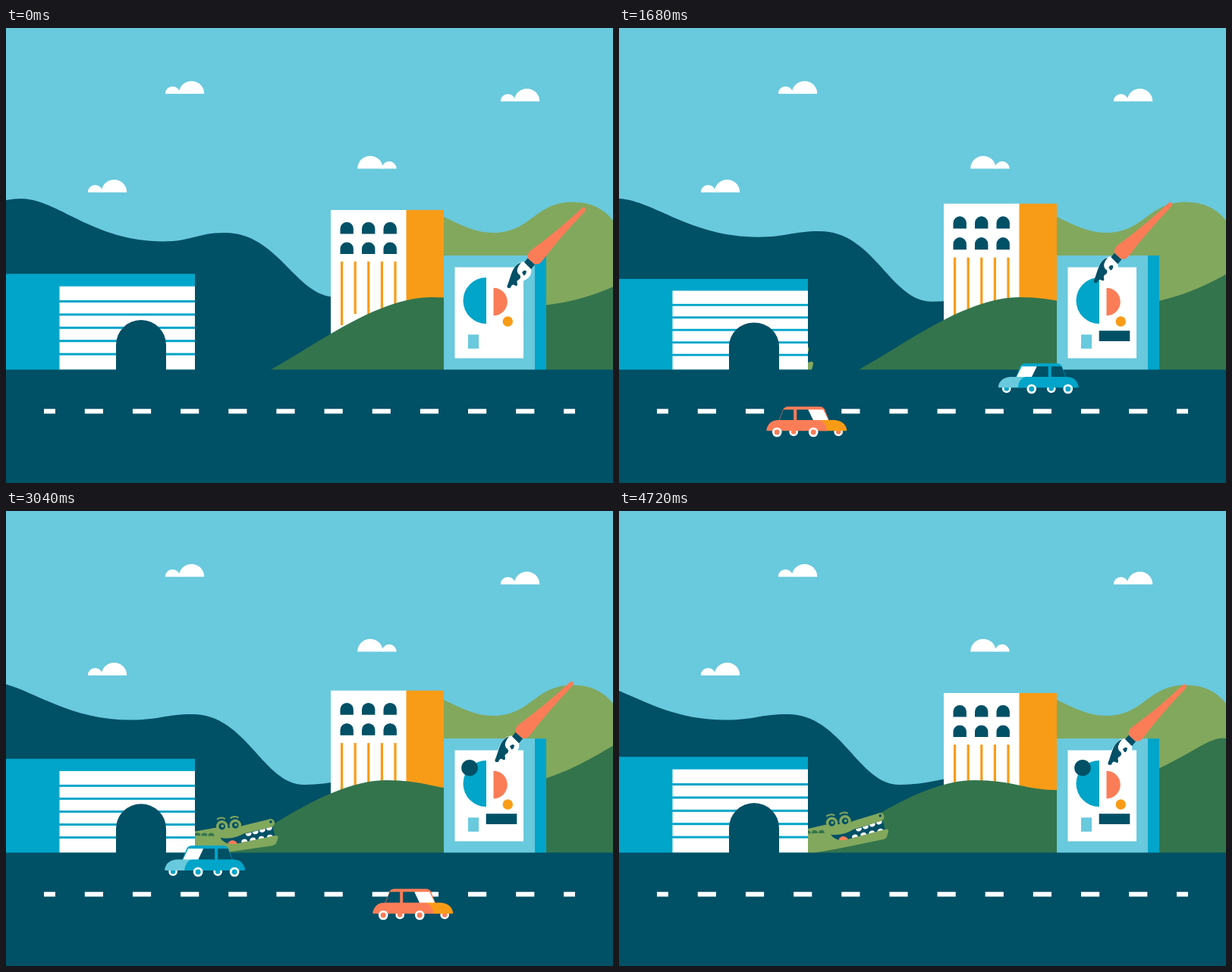
Write an HTML page with a canvas that moves like this. It is 800 px wide and 600 px high and loops after 4800 ms.

```html
<!DOCTYPE html>
<html>
<head>
<meta charset="utf-8">
<style>
html, body { margin: 0; width: 100%; height: 100%; overflow: hidden; }
canvas { display: block; }
</style>
</head>
<body>
<canvas id="stage" width="800" height="600"></canvas>
<script>
const ctx = document.getElementById('stage').getContext('2d');
const LOOP = 4800;
const SKY = '#69c9dd', NAVY = '#005066', TEAL = '#00a5c9', WHITE = '#fff',
      LIME = '#82a85d', GREEN = '#33744c', ORANGE = '#f89c17', CORAL = '#fa7d57';

// Eased progress from 0 to 1 between two times
function ramp(t, from, to) {
  const p = Math.min(1, Math.max(0, (t - from) / (to - from)));
  return (1 - Math.cos(Math.PI * p)) / 2;
}

function rect(color, x, y, w, h) {
  ctx.fillStyle = color;
  ctx.fillRect(x, y, w, h);
}

function disc(color, x, y, r, from = 0, to = 2 * Math.PI) {
  ctx.fillStyle = color;
  ctx.beginPath();
  ctx.arc(x, y, r, from, to);
  ctx.fill();
}

function shape(color, d) {
  ctx.fillStyle = color;
  ctx.fill(new Path2D(d));
}

function at(x, y, draw) {
  ctx.save();
  ctx.translate(x, y);
  draw();
  ctx.restore();
}

function stretchY(base, scale, draw) {
  ctx.save();
  ctx.translate(0, base * (1 - scale));
  ctx.scale(1, scale);
  draw();
  ctx.restore();
}

function cloud(x, y, flip) {
  at(x, y, () => {
    if (flip) ctx.scale(-1, 1);
    disc(WHITE, -16, 0, 9.7, Math.PI, 0);
    disc(WHITE, 9, 0, 16.8, Math.PI, 0);
  });
}

function farHills(t) {
  const settle = 6 * Math.exp(-t / 500);
  at(-.014 * t, 0, () => {
    const low = 275.5 + settle, high = 268 + settle / 3, end = 361 - settle;
    shape(NAVY, `M-60 452V250C-30 233 0 225 20 225C67 225 115 ${low} 207 ${low}
      C245 ${low} 252 ${high} 288 ${high}C360 ${high} 381 ${end} 436 ${end}C470 ${end} 500 352 530 345V452z`);
  });
  shape(LIME, 'M577 452V249C598 259 618 270 642 270C692 270 697 229.5 747 229.5C770 229.5 788 238 800 254V452z');
}

function nearHills(t) {
  at(-.0196 * t, 0, () => shape(GREEN, `M346 452L350 450C410 417 490 355 561 355C611 355 630 368 669 368
    C802 368 855 299.5 888 299.5Q912 300 940 320V452z`));
}

function tower(bounce) {
  stretchY(430, (190 + 30 * bounce) / 190, () => {
    rect(WHITE, 428, 240, 100, 190);
    rect(ORANGE, 527.5, 240, 49.5, 190);
    for (let i = 0; i < 6; i++)
      shape(NAVY, `M${440.5 + i % 3 * 28.5} ${i < 3 ? 271.5 : 298}v-7a8.7 8.5 0 0 1 17.4 0v7z`);
    for (let i = 0; i < 5; i++) rect(ORANGE, 441 + i * 17.6, 308, 3.2, i === 1 ? 69 : 84);
  });
}

function hall(bounce) {
  stretchY(450, (126 - 24 * bounce) / 126, () => {
    rect(TEAL, 0, 324.2, 249, 127);
    rect(WHITE, 70.5, 340.7, 178.5, 110);
    for (let i = 0; i < 5; i++) rect(TEAL, 70, 359 + i * 17.4, 179, 3);
    shape(NAVY, 'M145 451V418a33 33 0 0 1 66 0V451z');
  });
}

function poster(t) {
  rect(SKY, 577, 300, 120, 151);
  rect(TEAL, 697, 300, 15, 151);
  rect(WHITE, 591.5, 315.5, 90.5, 120);
  disc(TEAL, 633, 359.5, 30.5, Math.PI / 2, Math.PI * 1.5);
  disc(CORAL, 642.5, 361, 18.3, -Math.PI / 2, Math.PI / 2);
  disc(ORANGE, 661.3, 387, 6.7);
  rect(SKY, 609, 404.3, 14, 18.5);
  rect(NAVY, 632.7, 399.2, 40.6 * ramp(t, 740, 1130), 13.8);
  disc(NAVY, 611, 338.7, 10.8 * ramp(t, 1720, 2000));
}

// Dips to the paper, draws the bar, then the dot, then hovers
function brush(t, sway) {
  const dip = ramp(t, 0, 720), bar = ramp(t, 740, 1130), lift = ramp(t, 1130, 1640),
        dot = ramp(t, 1640, 1960), rest = ramp(t, 1960, 2300);
  const x = -33 * dip + 44 * bar - 45 * lift - 16 * dot + 34 * rest;
  const y = 70 * dip - 7 * bar - 70 * lift + 4 * dot - (5 + 8 * sway) * rest;
  at(x, y, () => {
    shape(WHITE, 'M683 308L692 317Q694 327 685 332Q677 337 672 334L664 338Q662 320 677 309z');
    shape(NAVY, 'M679 309C666 314 666 328 660.5 340Q660 344 665 342.5Q667 337 670 339Q674 342 674 337Q672 333 677 331Q680 327 675 324Q671 319 679 309z');
    shape(NAVY, 'M680 322q4-4 6-1q-1 6-4 5z');
    shape(NAVY, 'M688 303L697 312L692 318L683 309z');
    shape(CORAL, 'M759 237.5Q763 235 764 239Q763 242 761 244Q732 274 706 308Q702 313 696 311L688 304Q686 298 692 293Q728 267 759 237.5z');
  });
}

function crocodile(t) {
  if (t < 1550) return;
  const hidden = 1 - ramp(t, 1550, 2300);
  const tilt = -.01 - .033 * Math.cos((t - 4360) / 418);
  at(200 - 106 * hidden + 50 * tilt, 440 + 24 * hidden, () => {
    ctx.rotate(tilt);
    ctx.translate(-200, -440);
    // Mouth, tongue and teeth
    shape(NAVY, 'M281 429L349 410L353 425L300 438Q286 438 281 429z');
    shape(CORAL, 'M291 436Q297 428 304 436L300 440z');
    for (let i = 0; i < 4; i++) {
      disc(WHITE, 318 + i * 9, 422 - i * 2.7, 4, -.25, Math.PI - .25);
      disc(WHITE, 313 + i * 11.2, 434 - i * 2.2, 4, Math.PI - .2, -.2);
    }
    // Jaws and body
    shape(LIME, 'M180 426Q225 423 249 421L274 416Q300 417 312 412L342 404Q352 401 352 409Q351 413 346 414L312 423Q296 432 281 429Q286 438 300 437L353 424.5Q358 424 357 428L355 434Q354 437 349 438L290 448Q270 451 249 454L180 458z');
    for (let i = 0; i < 3; i++) disc(GREEN, 251 + i * 9, 427, 4, Math.PI, 0);
    disc(LIME, 347, 407.5, 5);
    disc(NAVY, 347, 406.5, 1.8);
    for (let i = 0; i < 2; i++) at(283 + i * 17.5, 414 - i * 2, () => {
      disc(LIME, 0, 0, 7.8);
      disc(NAVY, 0, 0, 4.3);
      disc(LIME, .6, -.5, 1.9);
      ctx.strokeStyle = LIME;
      ctx.lineWidth = 2;
      ctx.stroke(new Path2D('M-7-9Q-2-13 4-10'));
    });
  });
}

function wheel(color, x, y, r) {
  disc(WHITE, x, y, r);
  disc(color, x, y, r * .55);
}

// Faces right; the origin is the rear end at axle height
function car(x, y, sway, body, hood, flip) {
  at(x, y, () => {
    if (flip) { ctx.translate(106, 0); ctx.scale(-1, 1); }
    wheel(body, 36, -.5, 5.8);
    wheel(body, 95, -.5, 5.8);
    stretchY(14, 1 - .186 * sway, () => {
      shape(body, 'M16 -18L22 -35Q24 -39.5 29 -39.5H70Q75 -39.5 77 -35L83 -18z');
      shape(NAVY, 'M17 -19L22.5 -35H36V-19zM40 -35H56L62 -19H40z');
      shape(WHITE, 'M55 -35H75L82 -19H62z');
      shape(hood, 'M70 -19.5H90Q104 -18 106 -5Q106 -3.5 104 -3.5H70z');
      shape(body, 'M0 -5Q3 -19.5 16 -19.5H70Q79 -17 80 -3.5H2Q0 -3.5 0 -5z');
    });
    wheel(body, 14, 0, 6.3);
    wheel(body, 62, 0, 6.3);
  });
}

function road() {
  rect(NAVY, 0, 450.5, 800, 150);
  rect(WHITE, 50, 502.3, 15, 6.2);
  rect(WHITE, 735, 502.3, 15, 6.2);
  for (let i = 0; i < 10; i++) rect(WHITE, 103.8 + i * 63.15, 502.3, 24.2, 6.2);
}

function draw(t) {
  const phase = t % 920;
  const bounce = ramp(phase, 230, 470) - ramp(phase, 470, 920);
  const sway = (1 - Math.cos(2 * Math.PI * (t - 720) / 1320)) / 2;

  rect(SKY, 0, 0, 800, 600);
  cloud(235.5, 86.7);
  cloud(677.5, 96.7);
  cloud(489, 185.5, true);
  cloud(133.5, 216.7);

  farHills(t);
  tower(bounce);
  nearHills(t);
  crocodile(t);
  hall(bounce);
  poster(t);
  road();
  car(859 - .2137 * t, 476, sway, TEAL, SKY, true);
  car(-163 + .2125 * t, 533, sway, CORAL, ORANGE);
  brush(t, sway);
}

function frame() {
  draw(performance.now() % LOOP);
  requestAnimationFrame(frame);
}
frame();
</script>
</body>
</html>
```
